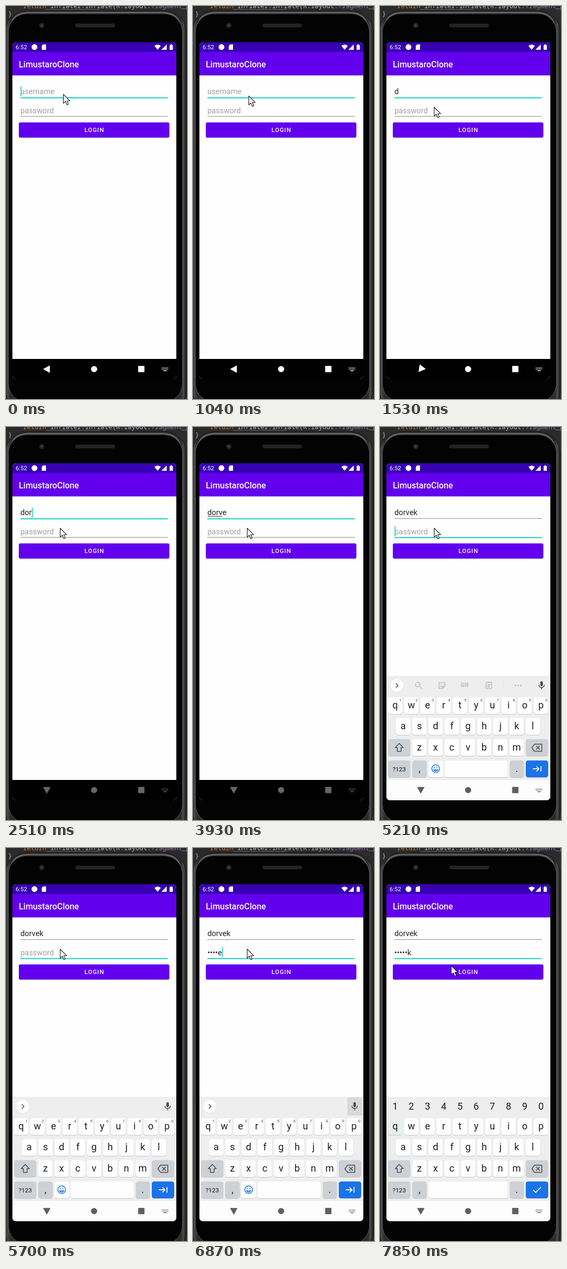
Animation of 339 by 736 pixels, one loop 8 s. Source, as an HTML page:

```html
<!DOCTYPE html>
<html lang="en">
<head>
<meta charset="utf-8">
<title>Login screen</title>
<style>
html, body { margin: 0; width: 100%; height: 100%; overflow: hidden; background: #2b2b2b; }
svg { display: block; width: 339px; height: 736px; }
text { font-family: Roboto, Arial, sans-serif; white-space: pre; }
.code { font: 12.1px "Noto Sans Mono", "DejaVu Sans Mono", monospace; }
.field { font-size: 14.4px; }
.key { font-size: 18px; fill: #1d1d1f; text-anchor: middle; }
.sup { font-size: 8px; fill: #55585c; text-anchor: middle; }
.line { fill: none; stroke: #4a4d51; stroke-width: 1.5; }
</style>
</head>
<body>
<svg viewBox="0 0 339 736" xmlns="http://www.w3.org/2000/svg">
  <defs>
    <clipPath id="glass"><rect x="12" y="68" width="307" height="631" rx="7"/></clipPath>
    <linearGradient id="rim" x1="0" x2="1" y1="0" y2="0">
      <stop offset="0" stop-color="#191919"/><stop offset=".012" stop-color="#4b4b4b"/>
      <stop offset=".03" stop-color="#2a2a2a"/><stop offset=".97" stop-color="#2a2a2a"/>
      <stop offset=".985" stop-color="#4b4b4b"/><stop offset="1" stop-color="#191919"/>
    </linearGradient>
  </defs>

  <rect width="339" height="736" fill="#2b2b2b"/>
  <text class="code" x="32" y="4" fill="#a9b7c6"><tspan fill="#cc7832">return </tspan>inflater.inflate(R.layout.<tspan fill="#9876aa" font-style="italic">fragment_po</tspan></text>
  <text class="code" x="4" y="19" fill="#a9b7c6">}</text>
  <path d="M75 6.7H176" stroke="#606060"/>

  <rect x="-1.5" y="9" width="339" height="750" rx="40" fill="url(#rim)" stroke="#151515"/>
  <path d="M8 42Q10 13 42 12H293Q325 13 328 42" fill="none" stroke="#6d6d6d" stroke-width="2"/>
  <rect x="4.5" y="14.5" width="326" height="727" rx="34" fill="#030303" stroke="#5a5a5a"/>
  <circle cx="67" cy="36.5" r="5.2" fill="#1b1e24"/>
  <circle cx="67" cy="36.5" r="2.3" fill="#35445e"/>
  <rect x="130" y="33" width="74" height="7" rx="3" fill="#232323"/>

  <g clip-path="url(#glass)">
    <rect x="12" y="68" width="307" height="631" fill="#fefefe"/>
    <rect x="12" y="68" width="307" height="18.5" fill="#3700b3"/>
    <rect x="12" y="86" width="307" height="44" fill="#6200ee"/>
    <g fill="#fff">
      <text x="18" y="81.2" font-size="11.2">6:52</text>
      <circle cx="53.3" cy="77" r="5.4"/>
      <path d="M69.6 72H75V82H67V74.6Z"/>
      <path d="M278 74.8Q284 69.6 290 74.8L284 82Z"/>
      <path d="M301 72V82H291Z"/>
      <path d="M306.5 73.2H308V72H311V73.2H312.5V82H306.5Z"/>
      <text x="24" y="114.6" font-size="15.9" font-weight="500">LimustaroClone</text>
    </g>

    <rect id="lineUser" x="27" width="276"/>
    <rect id="linePass" x="27" width="276"/>
    <text id="user" class="field" x="27" y="165.4"></text>
    <text id="pass" class="field" x="27" y="200.6"></text>
    <rect id="compose" x="27.5" y="166.8" height="1" fill="#333"/>
    <rect id="caret" width="1.6" height="19" fill="#14d3c0"/>

    <rect x="24" y="219" width="282" height="28.3" rx="3.5" fill="#bdb3cc"/>
    <rect x="24" y="218" width="282" height="28.3" rx="3" fill="#6200ee"/>
    <text x="147" y="236.2" font-size="11.2" font-weight="500" letter-spacing="1" fill="#fff">LOGIN</text>

    <g id="board"></g>

    <rect id="bar" x="12" y="661" width="307" height="38"/>
    <g id="nav">
      <path id="back" d="M-6 0L5.3 -6.3V6.3Z" stroke-width="1" stroke-linejoin="round"/>
      <circle cx="165" cy="680" r="5.8"/>
      <rect x="247.5" y="674" width="11.8" height="11.8" rx="1"/>
      <path id="dots" fill="none" stroke-width="1.4"
        d="M291.8 677.7H304M291.8 680.4H304" stroke-dasharray="1.5 1.1"/>
      <rect x="294.8" y="682.2" width="6.2" height="1.4"/>
    </g>
  </g>

  <path id="mouse" d="M0 0V16.8L3.9 13.2L6.7 19.6L9.4 18.4L6.7 12.2H12Z"
    fill="#fff" stroke="#16161c" stroke-width="1.1" stroke-linejoin="round"/>
</svg>

<script>
const LOOP = 8000, PITCH = 30.35;
const $ = id => document.getElementById(id);
const set = (id, attrs) => {
  for (const k in attrs) $(id).setAttribute(k, attrs[k]);
};
const show = (id, on) => set(id, { display: on ? "inline" : "none" });

// ---- keyboard ----
const GREY = "#cdd1d6";
const key = (x, y, w, fill = "#fefefe", id = "") =>
  `<rect x="${x}" y="${y + 1}" width="${w}" height="31.5" rx="4.5" fill="#c3c5c8"/>` +
  `<rect ${id && `id="${id}"`} x="${x}" y="${y}" width="${w}" height="31.5" rx="4.5" fill="${fill}"/>`;
const label = (s, x, y, cls = "key") => `<text class="${cls}" x="${x}" y="${y}">${s}</text>`;
const digits = [..."1234567890"];

const letters = (row, cx, y) => [...row].map((c, i) => {
  const x = cx + i * PITCH;
  return key(x - 13.5, y, 27, "#fefefe", c === "q" ? "keyQ" : "") + label(c, x, y + 21.2);
}).join("");

const tools = `
  <g id="tools">
    <circle class="line" cx="70.7" cy="482.3" r="4.3"/><path class="line" d="M74 485.6L78.5 490"/>
    <path class="line" d="M110.5 478.5H121.5V485.5L117.5 489.5H110.5Z M117.5 489V485.5H121"/>
    <path class="line" stroke-width="1" d="M113.2 484.5Q115.4 487.4 117.4 484.8M113.5 481.8H114.8M117.5 481.8H118.8"/>
    <text x="159.3" y="487.4" font-size="10.2" font-weight="900" text-anchor="middle" fill="#4a4d51" letter-spacing=".4">GIF</text>
    <rect class="line" x="198.8" y="478" width="10.6" height="12" rx="1"/>
    <path class="line" d="M201.5 478.3H206.7M201.3 482.3H207M201.3 484.8H207M201.3 487.3H205"/>
    <rect x="231" y="475" width="1" height="18" fill="#d3d3d3"/>
    <g fill="#4a4d51"><circle cx="253.8" cy="484" r="1.6"/><circle cx="258.8" cy="484" r="1.6"/><circle cx="263.8" cy="484" r="1.6"/></g>
  </g>`;

$("board").innerHTML = `
  <rect x="12" y="466" width="307" height="195" fill="#eeeeee"/>
  <g id="strip">
    <rect id="micBack" x="289" y="467" width="28" height="34" fill="#d9d9d9"/>
    <circle cx="31.5" cy="484.6" r="12" fill="#d6d6d6"/><circle cx="31.5" cy="484" r="12" fill="#fff"/>
    <path id="chevron" class="line" d="M1.8 -4L-2.2 0L1.8 4"/>
    ${tools}
    <rect x="300.3" y="476" width="4.8" height="9.4" rx="2.4" fill="#4a4d51"/>
    <path class="line" d="M297.6 482.8Q297.8 487.7 302.7 487.8Q307.6 487.7 307.8 482.8M302.7 487.8V491.5"/>
  </g>
  <g id="numbers">${digits.map((d, i) => label(d, 28.3 + i * PITCH, 490.4)).join("")}</g>
  ${letters("qwertyuiop", 28.3, 506)}
  <g id="sups">${digits.map((d, i) => label(d, 38.3 + i * PITCH, 514, "sup")).join("")}</g>
  ${letters("asdfghjkl", 43.5, 545)}
  ${key(15, 584.5, 42, GREY)}${letters("zxcvbnm", 73.7, 584.5)}${key(273, 584.5, 42, GREY)}
  <path class="line" d="M36 592.5L28.5 600.5H32.5V607.5H39.5V600.5H43.5Z" stroke-linejoin="round"/>
  <path class="line" d="M289.5 594H303V607.5H289.5L284.5 600.7Z M292.6 597.3L299.3 604.1M299.3 597.3L292.6 604.1" stroke-linejoin="round"/>
  ${key(15, 624.5, 42, GREY)}${key(60.5, 624.5, 27, GREY)}
  <text x="36" y="644.5" font-size="11.5" font-weight="500" text-anchor="middle" fill="#3a3c40">?123</text>
  ${label(",", 74, 646)}
  <g id="withSmile">${key(91, 624.5, 27)}${key(121, 624.5, 118.5)}
    <g class="line" style="stroke:#1a73e8"><circle cx="104.3" cy="640" r="7.2"/><path d="M100.4 642Q104.3 647 108.2 642Z"/>
    <path d="M101.2 637.8H102.8M105.8 637.8H107.4" stroke-width="2"/></g></g>
  <g id="wideSpace">${key(91, 624.5, 148.5)}</g>
  ${key(243, 624.5, 26.5, GREY)}${label(".", 256.2, 646)}
  ${key(273, 624.5, 42, "#1a73e8")}
  <path id="action" fill="none" stroke="#fff" stroke-width="1.7"/>`;

// ---- timeline: each step changes part of the state ----
const start = {
  mouse: [107, 165], user: "", pass: "", focus: "user", caret: 1, turn: 0,
  under: 0, nav: "#fff", board: 0, tools: 1, mic: 0, secret: 0, press: 0
};
const steps = [
  [420, { caret: 0 }],
  [920, { mouse: [108, 167] }],
  [1040, { mouse: [104, 168] }],
  [1290, { mouse: [101, 189] }],
  [1410, { user: "d", turn: -18 }],
  [1530, { turn: -52 }],
  [1650, { turn: -82, caret: 1 }],
  [1770, { turn: -90 }],
  [2140, { user: "dor" }],
  [2510, { nav: "#666" }],
  [3130, { caret: 0 }],
  [3280, { user: "dorv", caret: 1 }],
  [3560, { user: "dorve" }],
  [3680, { under: 4 }],
  [3930, { caret: 0 }],
  [4450, { board: 1, nav: "#5f5f5f", under: 5, caret: 1 }],
  [4720, { user: "dorvek", under: 6 }],
  [4970, { focus: "pass", under: 0, tools: .8 }],
  [5090, { tools: .55 }],
  [5210, { tools: .3 }],
  [5330, { tools: .1 }],
  [5450, { tools: 0 }],
  [5700, { caret: 0 }],
  [5820, { mic: .5 }],
  [5940, { mic: 1 }],
  [6470, { pass: "•o", caret: 1 }],
  [6590, { pass: "••r" }],
  [6750, { pass: "•••v" }],
  [6870, { pass: "••••e" }],
  [7140, { pass: "•••••k", secret: 1 }],
  [7290, { press: 1 }],
  [7540, { mouse: [104, 198], caret: 0 }],
  [7690, { mouse: [122, 213] }],
  [7850, { mouse: [133, 220] }]
];

function field(id, value, hint) {
  $(id).textContent = value || hint;
  set(id, { fill: value ? "#222" : "#a0a0a0" });
}
function rule(id, y, on) {
  set(id, on ? { y: y, height: 1.9, fill: "#14d3c0" } : { y: y, height: 1, fill: "#8c8c8c" });
}

function draw(s) {
  field("user", s.user, "username");
  field("pass", s.pass, "password");
  rule("lineUser", 171, s.focus === "user");
  rule("linePass", 206.2, s.focus === "pass");

  const typed = s[s.focus];
  const end = typed ? $(s.focus).getComputedTextLength() : 0;
  set("caret", { x: 27.4 + end, y: s.focus === "user" ? 150.5 : 185.8 });
  show("caret", s.caret);
  set("compose", { width: s.under ? $("user").getSubStringLength(0, s.under) - .8 : 0 });

  show("board", s.board);
  show("strip", !s.secret);
  show("sups", !s.secret);
  show("numbers", s.secret);
  show("withSmile", !s.secret);
  show("wideSpace", s.secret);
  set("tools", { opacity: s.tools });
  set("micBack", { opacity: s.mic });
  set("chevron", { transform: `translate(31.5 484) scale(${s.tools === 1 ? 1 : -1} 1)` });
  set("keyQ", { fill: s.press ? "#e9efec" : "#fefefe" });
  set("action", { d: s.secret
    ? "M287 640.5L291.5 645L301.5 635"
    : "M286 640.2H297.5M293 635.5L297.7 640.2L293 645M301.5 635V645.5" });

  set("bar", { fill: s.board ? "#fdfdfd" : "#000" });
  set("nav", { fill: s.nav });
  set("dots", { stroke: s.nav });
  set("back", { stroke: s.nav, transform: `translate(76.4 680) rotate(${s.turn})` });
  set("mouse", { transform: `translate(${s.mouse.map(v => v + .5)})` });
}

let last = -1;
function tick() {
  const t = performance.now() % LOOP;
  const n = steps.filter(([at]) => at <= t).length;
  if (n !== last) {
    draw(Object.assign({}, start, ...steps.slice(0, n).map(p => p[1])));
    last = n;
  }
  requestAnimationFrame(tick);
}
tick();
</script>
</body>
</html>
```
